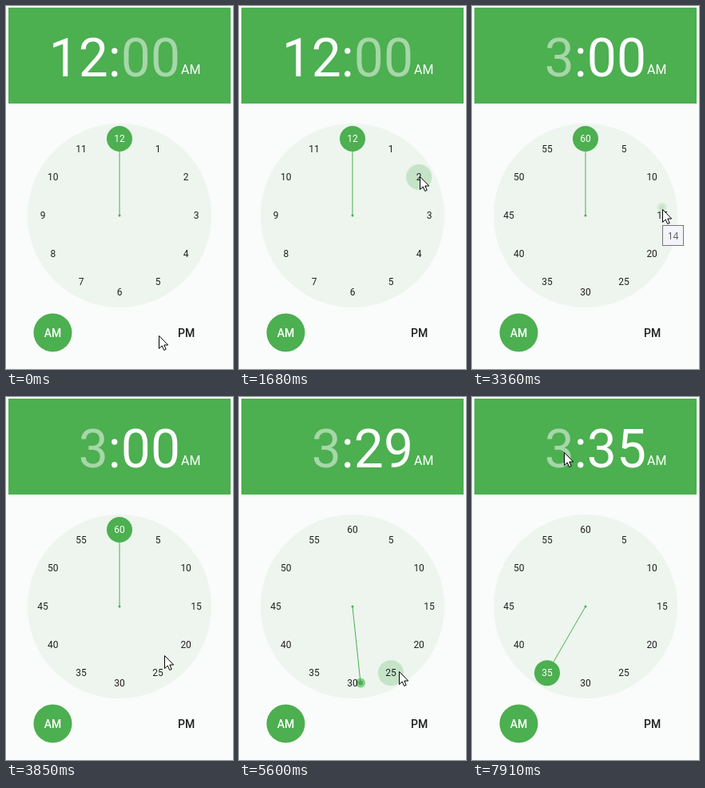
These frames come from a looping animation (284x454 px, 8 s). An HTML page:

```html
<!DOCTYPE html>
<html lang="en">
<head>
<meta charset="utf-8">
<title>Time picker</title>
<style>
  html, body { margin: 0; width: 100%; height: 100%; overflow: hidden; background: #fafbfb; }
  svg { display: block; width: 284px; height: 454px; font: 12px Roboto, sans-serif; }
  .big { font-size: 66px; fill: #fff; }
  .dim { fill-opacity: .5; }
  .period { font-size: 14px; font-weight: 500; }
</style>
</head>
<body>
<svg id="stage" viewBox="0 0 284 454"></svg>
<script>
const LOOP = 8000, STEP = 70;
const PICK = 2380, SWAP = 840;               // hour chosen, length of the dial change
const GRAB = 4550, DROP = 6930, TICK = 155;  // drag of the minute hand
const CX = 142, CY = 262, R = 96;
const GREEN = '#4caf50', INK = '#212121';
const stage = document.getElementById('stage');

// time, x, y of the pointer tip
const path = [
  [70, 191, 412], [140, 202, 391], [280, 202, 391], [910, 130, 158], [1120, 172, 162],
  [1680, 226, 213], [2240, 237, 252], [3360, 238, 254], [3990, 187, 343], [4900, 187, 343],
  [6510, 218, 342], [7140, 218, 342], [7350, 234, 300], [7910, 115, 69]
];

const clamp = v => Math.max(0, Math.min(1, v));
const spot = m => {
  const a = m * Math.PI / 30;
  return [CX + R * Math.sin(a), CY - R * Math.cos(a)];
};
const circle = (x, y, r, fill = GREEN, opacity = 1) =>
  `<circle cx="${x}" cy="${y}" r="${r}" fill="${fill}" opacity="${opacity}"/>`;
const label = (x, y, text, fill, extra = '') =>
  `<text x="${x}" y="${y}" text-anchor="middle" fill="${fill}" ${extra}>${text}</text>`;

function pointer(t) {
  const i = Math.max(1, path.findIndex(p => p[0] >= t));
  const [t0, x0, y0] = path[i - 1], [t1, x1, y1] = path[i];
  const k = clamp((t - t0) / (t1 - t0));
  return [x0 + (x1 - x0) * k, y0 + (y1 - y0) * k].map(Math.round);
}

function minuteAt(t) {
  if (t < GRAB) return 0;
  return Math.min(35, 25 + Math.max(0, Math.floor((t - 4830) / TICK)));
}

// Dial position under the pointer; small marks lie above the labelled ones
function hoverAt(t) {
  const [x, y] = pointer(t >= GRAB && t < DROP ? GRAB : t);
  const m = Math.round(Math.atan2(x - CX, CY - y) * 30 / Math.PI + 60) % 60;
  const near = (n, r) => Math.hypot(x - spot(n)[0], y - spot(n)[1]) < r;
  if (t >= PICK + SWAP && near(m, 6)) return m;
  const five = Math.round(m / 5) * 5;
  return near(five, 16) ? five : null;
}

function marker(m, opacity = 1) {
  const [x, y] = spot(m);
  const shape = m % 5 ? circle(x, y, 6, GREEN, .6) + circle(x, y, 3) : circle(x, y, 16);
  return `<g opacity="${opacity}">${shape}</g>`;
}

// Twelve labels with a hand; unit is the value of each label step
function ring(unit, chosen, hover, scale, opacity) {
  const [x, y] = spot(chosen);
  let out = hover === null ? '' : marker(hover, .25);
  out += `<path d="M${CX} ${CY}L${x} ${y}" stroke="${GREEN}"/>` + circle(CX, CY, 1.5) + marker(chosen);
  for (let i = 1; i <= 12; i++) {
    const [lx, ly] = spot(i * 5);
    out += label(lx, ly + 4, i * unit, chosen % 60 === i * 5 % 60 ? '#fff' : INK);
  }
  return `<g opacity="${opacity}" transform="translate(${CX} ${CY}) scale(${scale}) translate(${-CX} ${-CY})">${out}</g>`;
}

function dial(t) {
  const hover = hoverAt(t);
  if (t < PICK) return ring(1, 0, hover, 1, 1);
  const p = clamp((t - PICK) / SWAP);
  const hours = p < 1 ? ring(1, 15, null, 1 + .43 * p, 1 - p ** 1.5) : '';
  return hours + ring(5, minuteAt(t), hover, 1 - .2 * (1 - p) ** 4, 1 - (1 - p) ** 2.4);
}

function header(t) {
  const picked = t >= PICK;
  const dim = on => on ? 'class="dim"' : '';
  const mm = String(minuteAt(t)).padStart(2, '0');
  return `<rect x="3" y="2" width="278" height="120" fill="${GREEN}"/>
    <text class="big" x="218" y="88" text-anchor="end"><tspan ${dim(picked)}>${picked ? 3 : 12}</tspan><tspan>:</tspan><tspan ${dim(!picked)}>${mm}</tspan></text>
    <text x="219" y="85" font-size="16" fill="#fff">AM</text>`;
}

function tooltip(t) {
  if (t < 3290 || t >= 3640) return '';
  return '<rect x="238.5" y="274.5" width="26" height="25" fill="#f3f4f9" stroke="#767676"/>' +
    label(251.5, 292, 14, '#575757', 'font-family="Open Sans, sans-serif"');
}

function draw(t) {
  stage.innerHTML = header(t) +
    circle(CX, CY, 115, '#edf5ee') +
    circle(58.5, 408.5, 24) +
    label(58.5, 413.5, 'AM', '#fff', 'class="period"') +
    label(225.7, 413.5, 'PM', INK, 'class="period"') +
    dial(t) + tooltip(t) +
    `<path transform="translate(${pointer(t)})" d="M.5.5V16.5L4.2 13 6.7 18.5 9.2 17.4 6.8 12H11.7Z" fill="#fff" stroke="#000"/>`;
}

let shown = -1;
function tick() {
  const t = Math.min(7910, Math.floor(performance.now() % LOOP / STEP) * STEP);
  if (t !== shown) draw(shown = t);
  requestAnimationFrame(tick);
}
tick();
</script>
</body>
</html>
```
